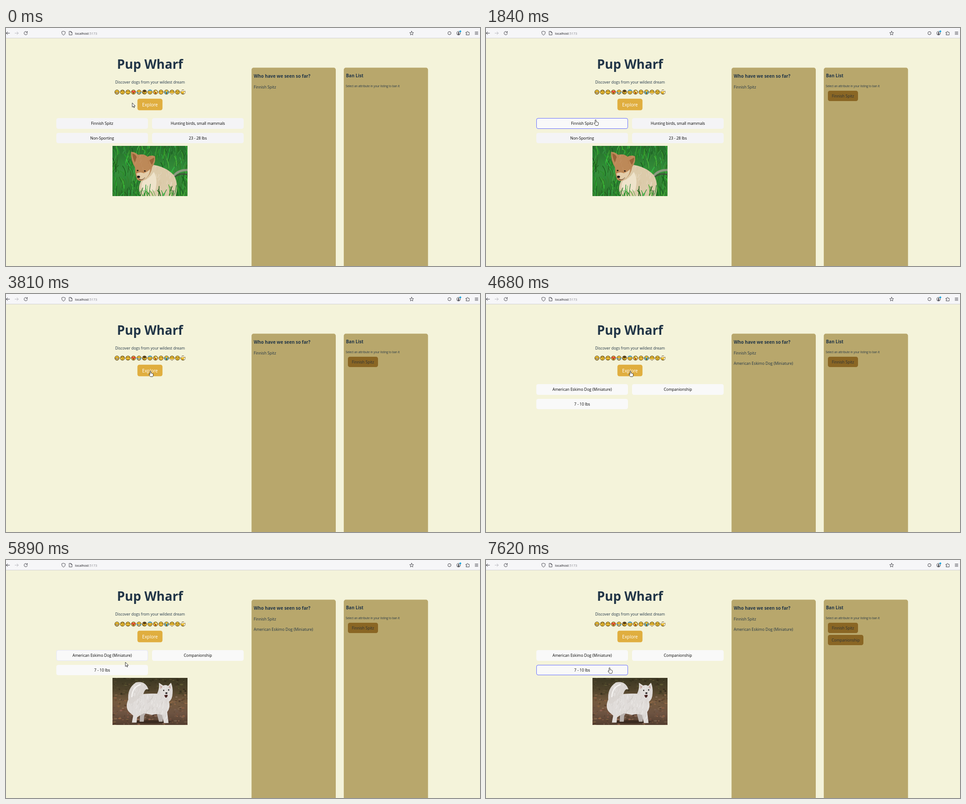
An HTML page with a canvas for the animation above (8000 ms loop, 1055 by 531 pixels).

```html
<!DOCTYPE html>
<html lang="en">
<head>
<meta charset="utf-8">
<title>Pup Wharf</title>
<style>
html, body { margin: 0; width: 100%; height: 100%; overflow: hidden; background: #f4f3da; }
body { position: relative; font-family: "Open Sans", "Noto Sans", sans-serif; color: #213547; }
canvas, .box, .text, svg { position: absolute; }
canvas, svg { left: 0; top: 0; }
.box { border-radius: 4.5px; }
.text { line-height: 20px; white-space: pre; }
</style>
</head>
<body>
<canvas id="page" width="1055" height="531"></canvas>
<script>
const LOOP = 8000, CLEAR = 3810, LOADED = 4680, PHOTO = 4830;
const BODY = 8.5;
const INK = '#213547';

// ---------- page elements ----------
function add(cls, style, content = '') {
  const el = document.createElement('div');
  el.className = cls;
  Object.assign(el.style, style);
  el.innerHTML = content;
  document.body.append(el);
  return el;
}

function box(x, y, w, h, color) {
  return add('box', { left: x + 'px', top: y + 'px', width: w + 'px', height: h + 'px', background: color });
}

// y is the baseline; a width centres the text inside it
function text(content, x, y, size = BODY, opt = {}) {
  const style = { left: x + 'px', top: y - 10 - 0.388 * size + 'px', fontSize: size + 'px', color: opt.color || INK };
  if (opt.width) Object.assign(style, { width: opt.width + 'px', textAlign: 'center' });
  if (opt.bold) style.fontWeight = 700;
  return add('text', style, content);
}

const show = (el, on) => { el.style.visibility = on ? 'visible' : 'hidden'; };

text('localhost<span style="color:#85858c">:5173</span>', 153.6, 14.5, 7.3, { color: '#15141a' });
text('Pup Wharf', 112, 91, 28, { bold: true, width: 417 });
text('Discover dogs from your wildest dream', 112, 124.2, BODY, { width: 417 });
text('Explore', 292.5, 175.2, 9.95, { color: '#fff', width: 56 });
text('Who have we seen so far?', 551.5, 110.8, 9.87, { bold: true });
text('Ban List', 756.8, 110.8, 9.7, { bold: true });
text('Select an attribute in your listing to ban it', 756.3, 132.2, 6.27);
text('Finnish Spitz', 551.5, 135.6);
const seen = text('American Eskimo Dog (Miniature)', 551.5, 158);

function ban(label, y, w, start) {
  const parts = [box(761, y, w, 23, '#8a6624'), text(label, 761, y + 15.7, BODY, { width: w, color: '#2a3236' })];
  return { parts, start };
}
const bans = [ban('Finnish Spitz', 140, 67, 1840), ban('Companionship', 167, 79, 6760)];

// ---------- attribute buttons ----------
const labels = [
  ['Finnish Spitz', 'Hunting birds, small mammals', 'Non-Sporting', '23 - 28 lbs'],
  ['American Eskimo Dog (Miniature)', 'Companionship', '7 - 10 lbs', '']
];
const hovers = [[[1290, 2400], [5590, 5760]], [[6290, 7100]], [[7400, 9000]], []];
const fields = labels[0].map((_, i) => {
  const x = i % 2 ? 325 : 112, [y, h] = i < 2 ? [201, 24] : [234, 23];
  return { x, y, h, el: box(x, y, 204, h, '#f9f9f9'), label: text('', x, y + h / 2 + 3.3, BODY, { width: 204, color: '#000' }) };
});

const unit = v => Math.max(0, Math.min(1, v));
const glow = (spans, t) => Math.max(0, ...spans.map(([on, off]) => unit((t - on) / 150) * (1 - unit((t - off) / 150))));

// ---------- canvas drawing ----------
const ctx = document.getElementById('page').getContext('2d');

function fill(color, d) {
  ctx.fillStyle = color;
  ctx.fill(new Path2D(d));
}
function line(color, width, d) {
  ctx.strokeStyle = color;
  ctx.lineWidth = width;
  ctx.stroke(new Path2D(d));
}
function dot(color, x, y, rx, ry = rx) {
  ctx.fillStyle = color;
  ctx.beginPath();
  ctx.ellipse(x, y, rx, ry, 0, 0, 7);
  ctx.fill();
}
function ring(color, width, x, y, r, a = 0, b = 7) {
  ctx.strokeStyle = color;
  ctx.lineWidth = width;
  ctx.beginPath();
  ctx.arc(x, y, r, a, b);
  ctx.stroke();
}
function panel(color, x, y, w, h) {
  ctx.fillStyle = color;
  ctx.beginPath();
  ctx.roundRect(x, y, w, h, 4.5);
  ctx.fill();
}
function random(seed) {
  return () => (seed = (seed * 16807) % 2147483647) / 2147483647;
}

function drawPanels() {
  panel('#e0ae3f', 292.5, 157.7, 55.8, 25.8);
  panel('#b8a76c', 546.5, 88.6, 187.5, 460);
  panel('#b8a76c', 751.8, 88.6, 187.5, 460);
}

function drawToolbar() {
  const c = '#3e3e46';
  ctx.fillStyle = '#f6f6f8';
  ctx.fillRect(0, 0, 1055, 22);
  ctx.fillStyle = '#d2d2d2';
  ctx.fillRect(0, 22, 1055, 1);
  ctx.lineCap = ctx.lineJoin = 'round';
  line(c, 1, 'M8 11.5H.5M3.6 8.4L.5 11.5L3.6 14.6');
  line('#b8b8be', 1, 'M20 11.5H27.5M24.4 8.4L27.5 11.5L24.4 14.6');
  ring(c, 1, 44, 11.5, 3.6, 0.2, 5.4);
  line(c, 1, 'M47.5 7.5V10.2H44.8');
  line(c, 0.9, 'M128 7.2L131.8 8.5V11Q131.5 14.5 128 16Q124.5 14.5 124.2 11V8.5Z');
  line(c, 0.9, 'M141 7.5H144.5L147 10V15.5H141ZM144.5 7.5V10H147');
  let star = '';
  for (let i = 0; i < 10; i++) {
    const r = i % 2 ? 2.1 : 4.7, a = i * Math.PI / 5;
    star += (i ? 'L' : 'M') + (902.8 + r * Math.sin(a)) + ' ' + (11.8 - r * Math.cos(a));
  }
  line(c, 0.9, star + 'Z');
  ring(c, 1, 987, 11.5, 3.5);
  ring(c, 0.9, 1007.3, 11.7, 4.1);
  dot(c, 1007.3, 10.4, 1.4);
  dot(c, 1007.3, 13.6, 2.4, 1.3);
  dot('#12a5e0', 1011.3, 7.4, 2);
  line(c, 0.9, 'M1024 9.5H1026V8.3Q1027.2 6.6 1028.4 8.3V9.5H1031V15.5H1024V13.7Q1026.4 13.5 1026.2 12.3Q1026 11.2 1024 11.3Z');
  line(c, 1, 'M1044 8.8H1050.5M1044 11.5H1050.5M1044 14.2H1050.5');
}

const DARK = '#2b1c10';
const smile = 'M-2.7 .8H2.7Q2 3.4 0 3.4Q-2 3.4 -2.7 .8Z';
const faces = [
  () => { fill('#fff', smile); line(DARK, 0.7, smile); },
  () => line(DARK, 0.8, 'M-1.8 2.3Q.8 2.8 2.2 1M-3 -2.4H-.8M.8 -2.8H3'),
  () => line(DARK, 0.8, 'M-2 3Q0 .8 2 3M-2.8 -2.4L-1 -1.6M2.8 -2.4L1 -1.6'),
  () => { dot('#e0343c', -2, -1.3, 1.9); dot('#e0343c', 2, -1.3, 1.9); fill('#7a2a20', smile); },
  () => { fill('#fff', smile); line(DARK, 0.6, smile); dot('#35a6e8', -3.8, 1.4, 1.3); dot('#35a6e8', 3.8, 1.4, 1.3); },
  () => { dot('#4a3522', 0, -2.8, 3.6, 1.6); line(DARK, 1, 'M-2.8 -.6H2.8M-2 2.6Q0 1 2 2.6M-3.6 1L-2.6 2.6'); },
  () => { line('#3a9bd0', 1.2, 'M-4 -3.8Q0 -6 4 -3.8Q0 -2.4 -4 -3.8Z'); line(DARK, 0.8, 'M-2.4 1.4Q0 4 2.4 1.4'); },
  () => { line(DARK, 0.8, 'M-3 -2.8L-.8 -1M2.8 -2.8L.8 -.8'); dot('#fff', 1.5, -1.5, 1.2); dot('#8a2c20', 0, 2, 2.1, 1.4); },
  () => { line(DARK, 0.7, 'M-2.8 -1.4H-1M1 -1.4H2.8M-.6 1.6Q1 2 -.4 2.9'); dot('#f19a3c', -3, 1, 1); dot('#f19a3c', 3, 1, 1); },
  () => { line('#35a6e8', 2.1, 'M-2.6 -1V3.4M2.6 -1V3.4'); dot(DARK, 0, 2, 1.2, 1.5); },
  () => { dot('#f2e8d6', -2, 3.4, 1.7, 1.2); dot('#f2e8d6', 2, 3.4, 1.7, 1.2); line(DARK, 0.7, 'M-3 -2.6L-1 -1.6M3 -2.6L1 -1.6M-1.6 2Q0 .8 1.6 2'); },
  () => line(DARK, 0.8, 'M-3 -1.2H-1M1 -1.2H3M-2 2H2'),
  () => { line('#fff', 2, 'M-3.6 -2.6L3.4 -3.4M2 2.6L4 0'); line(DARK, 0.7, 'M-1.8 3Q0 1.4 1.8 2.8'); }
];

function drawFaces() {
  faces.forEach((face, i) => {
    ctx.save();
    ctx.translate(247 + 12.25 * i, 143);
    dot('#fecb36', 0, 0, 5);
    ring('#2e2818', 0.9, 0, 0, 4.9);
    dot(DARK, -1.8, -1.2, 0.6, 0.7);
    dot(DARK, 1.8, -1.2, 0.6, 0.7);
    face();
    ctx.restore();
  });
}

function backdrop(h, ...colors) {
  const g = ctx.createLinearGradient(0, 0, 0, h);
  colors.forEach((c, i) => g.addColorStop(i / (colors.length - 1), c));
  ctx.fillStyle = g;
  ctx.fillRect(0, 0, 167, h);
}

function blades(rnd, n, y0, y1) {
  for (let i = 0; i < n; i++) {
    const x = rnd() * 175 - 4, y = y0 + rnd() * (y1 - y0), len = 8 + rnd() * 16;
    const c = `hsl(${108 + rnd() * 24} ${45 + rnd() * 20}% ${20 + rnd() * 30}%)`;
    line(c, 0.7 + rnd(), `M${x} ${y}q${rnd() * 3} ${-len / 2} ${rnd() * 16 - 8} ${-len}`);
  }
}

// fills a shape and ruffles it with short hairs in lighter and darker tones
function fur(rnd, n, color, light, d) {
  ctx.save();
  fill(color, d);
  line(color, 1.5, d);
  ctx.clip(new Path2D(d));
  for (let i = 0; i < n; i++) {
    const [hue, sat, low, high] = light;
    line(`hsl(${hue} ${sat}% ${low + rnd() * (high - low)}% / .5)`, 1.2,
      `M${rnd() * 167} ${rnd() * 112}q${rnd() * 3} 3 ${rnd() * 4 - 3} 7`);
  }
  ctx.restore();
}

function drawPuppy() {
  const rnd = random(77);
  backdrop(112, '#256f2c', '#348f3a', '#2c7a2c');
  blades(rnd, 330, 0, 125);
  line('#8c9a80', 5, 'M137 66Q148 53 167 54');
  line('#414c3a', 2.5, 'M140 68Q152 60 166 64');
  fur(rnd, 300, '#dccbaa', [40, 40, 68, 90], 'M84 42Q118 46 136 66Q147 84 140 112H64Q55 92 66 76Q82 68 84 42Z');
  fill('#eee3ca', 'M68 78Q82 74 92 58Q102 74 95 100L70 104Q60 92 68 78Z');
  fur(rnd, 300, '#bd8958', [28, 45, 46, 66], 'M42 14Q51 15 57 21Q70 17 78 25Q87 20 94 24Q96 36 88 46Q85 64 73 73Q62 81 55 74Q51 62 51 48Q41 32 42 14Z');
  fill('#9a6338', 'M44 17Q51 18 54 25L50 37Q45 28 44 17ZM93 26Q93 36 87 42L82 32Z');
  fill('#e3cdaa', 'M53 62Q60 57 70 61Q79 57 84 52Q83 66 72 74Q60 80 53 62Z');
  dot('#1d1a18', 58, 69, 3.3, 2.6);
  dot('#1d1512', 56, 55, 1.8, 1.4);
  dot('#1d1512', 72, 56, 2, 1.5);
  line('#4c3425', 1, 'M59 74Q65 78 72 71');
  blades(rnd, 80, 108, 125);
}

function drawSpitz() {
  const rnd = random(31);
  const white = [25, 8, 74, 98];
  backdrop(105, '#3b3722', '#4f432b', '#745a3e', '#6d5341', '#523d2f');
  for (let i = 0; i < 420; i++) {
    const y = rnd() * 105;
    const c = y > 38 ? `hsl(${16 + rnd() * 18} ${18 + rnd() * 22}% ${20 + rnd() * 30}% / .7)`
                     : `hsl(${32 + rnd() * 30} 30% ${11 + rnd() * 20}% / .7)`;
    dot(c, rnd() * 167, y, 0.8 + rnd() * 3, 0.6 + rnd() * 1.4);
  }
  dot('#3a2a20', 86, 98, 46, 3.5);
  fur(rnd, 60, '#b9b2ae', [25, 6, 60, 84], 'M60 70L62 86L61 97H69L70 84L76 74ZM98 74L104 97H111L112 76Z');
  fur(rnd, 600, '#e0dcd9', white, 'M36 48Q54 34 100 36Q106 22 104 12L113 18Q120 15 124 19L130 12Q134 22 133 34Q133 47 125 53Q129 66 121 76L124 100H115L111 82Q98 78 88 82L70 78Q58 84 54 88L53 99H44L47 84L38 76Q28 66 36 48Z');
  fur(rnd, 300, '#dad5d1', white, 'M36 50Q33 24 52 11Q72 6 79 25Q72 22 68 36Q60 44 46 54Q36 60 36 50Z');
  line('#f7f5f3', 2.5, 'M43 42Q45 20 62 15');
  fill('#c9a8a0', 'M106 16L111 20L107 25ZM128 16L130 24L125 21Z');
  dot('#221c1a', 114, 28, 1.4);
  dot('#221c1a', 125, 27, 1.4);
  dot('#191615', 120, 34, 2.4, 1.8);
  fill('#4a2522', 'M115 39Q120 37 123 38Q122 45 118 44Z');
}

const photos = [[112, drawPuppy], [105, drawSpitz]];
let shown = null;

function drawPhoto(k) {
  if (k === shown) return;
  shown = k;
  ctx.clearRect(237, 263, 167, 112);
  if (k < 0) return;
  const [h, draw] = photos[k];
  ctx.save();
  ctx.translate(237, 263);
  ctx.beginPath();
  ctx.rect(0, 0, 167, h);
  ctx.clip();
  draw();
  ctx.restore();
}

drawPanels();
drawToolbar();
drawFaces();

// ---------- mouse pointer ----------
document.body.insertAdjacentHTML('beforeend',
  '<svg width="1055" height="531"><path id="mouse" fill="#fff" stroke="#222" stroke-width=".9" stroke-linejoin="round"/></svg>');
const mouse = document.getElementById('mouse');
const ARROW = 'M0 0V9.6L2.2 7.6L3.7 10.8L5.1 10.2L3.6 7.1H6.7Z';
const HAND = 'M-1.1 7.8V1Q-1.1 -.2 0 -.2Q1.1 -.2 1.1 1V4.5Q2.6 4 3 4.9Q4.4 4.5 4.7 5.5Q6.2 5.3 6.2 7V9.3Q6 11 5 12.5H0Q-1 10.8 -3.2 8.2Q-3.6 6.6 -2.3 6.8Z';

// time, x, y: each position holds until the next
const path = [
  [0, 281, 167], [300, 289, 165], [450, 303, 164], [590, 309, 166], [740, 302, 172],
  [880, 284, 182], [1030, 268, 191], [1170, 254, 199], [1320, 244, 205], [1440, 244, 205],
  [2420, 296, 186], [2570, 321, 171], [3690, 321, 171], [3810, 321.5, 172],
  [5450, 318, 176], [5600, 300, 196], [5740, 277, 215], [5890, 265.7, 228], [6030, 272, 228],
  [6170, 297, 225.5], [6320, 332, 213], [6460, 356, 206], [6610, 357, 205],
  [7050, 345, 213], [7190, 322, 228], [7340, 300, 232], [7480, 283, 239], [7620, 275, 240.5]
];

const inside = (x, y, bx, by, w, h) => x >= bx && x <= bx + w && y >= by && y <= by + h;

function render(t) {
  const [step, x, y] = path.findLast(p => p[0] <= t);
  const set = labels[t < CLEAR ? 0 : 1];
  const listed = t < CLEAR || t >= LOADED;
  let hot = inside(x, y, 292.5, 158, 56, 25.5);

  fields.forEach((f, i) => {
    const on = listed && set[i] !== '';
    const bright = t >= LOADED || (i === 0 && t >= 1320);
    f.label.textContent = set[i];
    show(f.el, on);
    show(f.label, on);
    f.el.style.background = bright ? '#f9f9f9' : '#f4f4f6';
    f.el.style.boxShadow = `inset 0 0 0 1px rgba(100,108,255,${glow(hovers[i], step)})`;
    hot = hot || (on && inside(x, y, f.x, f.y, 204, f.h));
  });

  show(seen, t >= LOADED);
  for (const b of bans) b.parts.forEach(el => show(el, t >= b.start));
  drawPhoto(t < CLEAR ? 0 : t < PHOTO ? -1 : 1);
  mouse.setAttribute('d', hot ? HAND : ARROW);
  mouse.setAttribute('transform', `translate(${x} ${y})`);
}

const begin = performance.now();
function tick() {
  render((performance.now() - begin) % LOOP);
  requestAnimationFrame(tick);
}
tick();
</script>
</body>
</html>
```
